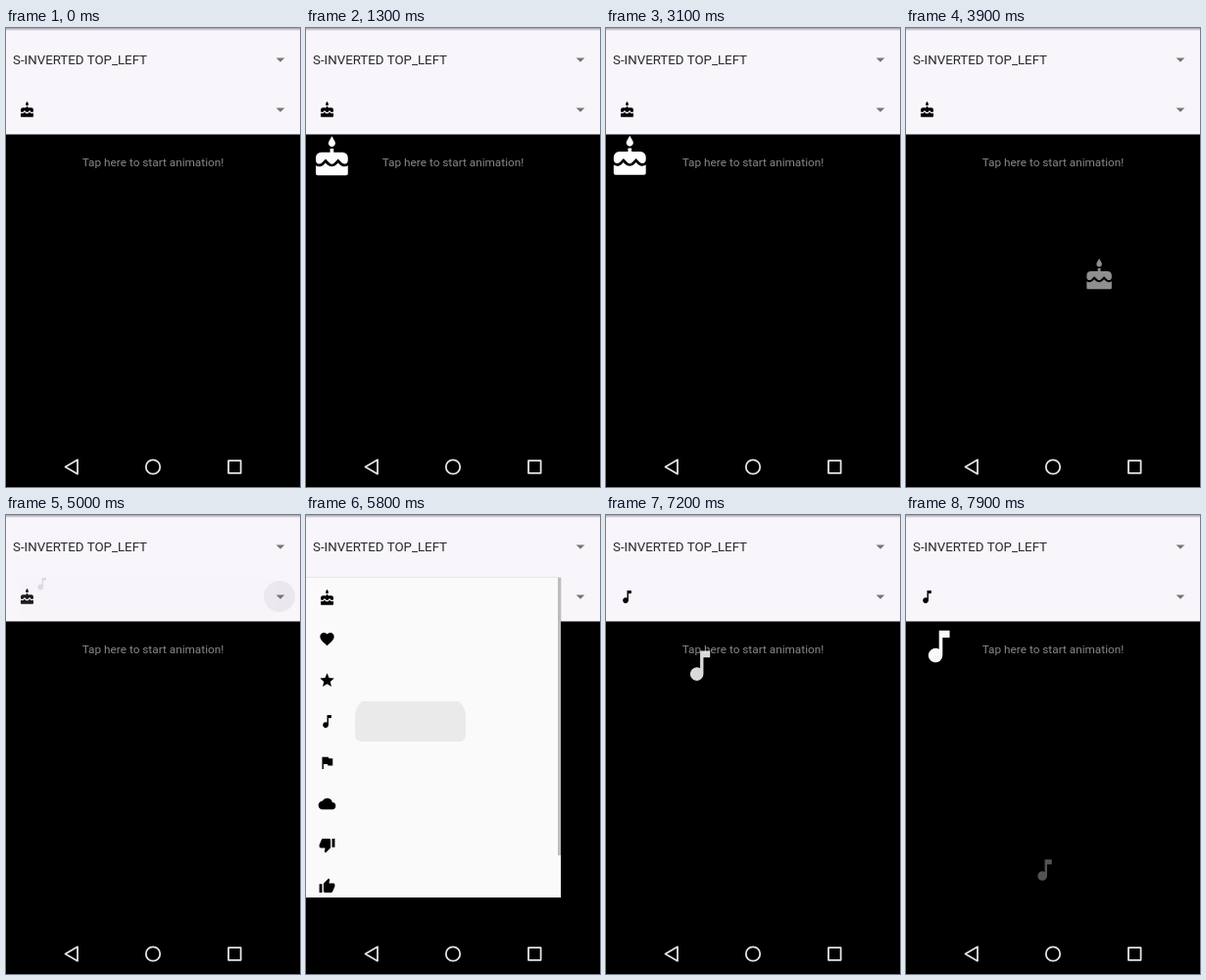
These frames come from a looping animation (300 px wide and 468 px high, 8 s). An HTML page:

```html
<!DOCTYPE html>
<html lang="en">
<head>
<meta charset="utf-8">
<title>Icon flight</title>
<style>
  html, body { margin: 0; width: 100%; height: 100%; overflow: hidden; background: #000; }
  svg { display: block; width: 100%; height: 100%; font-family: Roboto, sans-serif; }
</style>
</head>
<body>
<svg viewBox="0 0 300 468">
  <defs>
    <linearGradient id="topShade" x2="0" y2="1">
      <stop stop-color="#a39fab"/><stop offset="1" stop-color="#f8f5fb"/>
    </linearGradient>
    <clipPath id="menuClip"><rect id="menuClipBox"/></clipPath>
    <path id="route" d="M22 131C452 242-90 385 278 413"/>
    <!-- 24-unit icons, centred on the origin -->
    <path id="cake" transform="translate(-12 -12)" d="M12 6a2 2 0 0 0 1.7-3L12 0l-1.7 3A2 2 0 0 0 12 6z
      M18 9h-5V7h-2v2H6a3 3 0 0 0-3 3v1.5c0 2 2.2 2.6 3.4 1.4l2.1-2.1 2.1 2.1a2 2 0 0 0 2.8 0l2.1-2.1 2.1 2.1c1.2 1.2 3.4.6 3.4-1.4V12a3 3 0 0 0-3-3z
      M3 16.4V21a1 1 0 0 0 1 1h16a1 1 0 0 0 1-1v-4.6c-1.4.9-3.2.8-4.4-.4l-1.1-1.1L14.4 16a3.5 3.5 0 0 1-4.9 0l-1.1-1.1L7.4 16c-1.2 1.2-3 1.3-4.4.4z"/>
    <path id="heart" transform="translate(-12 -12)" d="M12 21.3l-1.5-1.3C5.4 15.4 2 12.3 2 8.5A5.4 5.4 0 0 1 7.5 3c1.7 0 3.4.8 4.5 2.1A6 6 0 0 1 16.5 3 5.4 5.4 0 0 1 22 8.5c0 3.8-3.4 6.9-8.5 11.5z"/>
    <path id="star" transform="translate(-12 -12)" d="M12 17.3l6.2 3.7-1.6-7L22 9.2l-7.2-.6L12 2 9.2 8.6 2 9.2 7.5 14l-1.7 7z"/>
    <path id="note" transform="translate(-12 -12)" d="M12 3v10.5A4 4 0 1 0 14 17V7h4V3z"/>
    <path id="flag" transform="translate(-12 -12)" d="M14.4 6L14 4H5v17h2v-7h5.6l.4 2h7V6z"/>
    <path id="cloud" transform="translate(-12 -12)" d="M19.4 10A7.5 7.5 0 0 0 5.4 8 6 6 0 0 0 6 20h13a5 5 0 0 0 .4-10z"/>
    <path id="thumbDown" transform="translate(-12 -12)" d="M15 3H6c-.8 0-1.5.5-1.8 1.2l-3 7.1L1 12v2a2 2 0 0 0 2 2h6.3l-1 4.9.5 1.1 1 1 6.6-6.6c.4-.4.6-.9.6-1.4V5a2 2 0 0 0-2-2zm4 0v12h4V3z"/>
    <use id="thumbUp" href="#thumbDown" transform="rotate(180)"/>
    <path id="arrow" d="M-4.3-2.1h8.6L0 2.2z" fill="#757575"/>
  </defs>

  <rect width="300" height="468"/>
  <rect width="300" height="108.5" fill="#f8f5fb"/>
  <rect width="300" height="3" fill="url(#topShade)"/>
  <text x="7" y="37" font-size="13.3" fill="#2a2a2a">S-INVERTED TOP_LEFT</text>
  <text x="150" y="141" font-size="11.8" fill="#888" text-anchor="middle">Tap here to start animation!</text>
  <circle id="arrowRipple" cx="279" cy="83" r="16"/>
  <use href="#arrow" x="280" y="32.5"/>
  <use href="#arrow" x="280" y="83.5"/>
  <use id="selected" transform="translate(21.5 83.5) scale(.72)"/>

  <g fill="none" stroke="#e4e4e4" stroke-width="1.8" stroke-linejoin="round">
    <path d="M60.5 447.5L73 440.3v14.4z"/>
    <circle cx="150" cy="447.5" r="7.2"/>
    <rect x="227" y="441.2" width="12.6" height="12.6"/>
  </g>

  <g id="flights" fill="#fff"></g>

  <g id="menu">
    <rect id="menuShadow" x="-1" y="63" width="262" height="328" rx="2"/>
    <g clip-path="url(#menuClip)">
      <rect y="64" width="300" height="326" fill="#fafafa"/>
      <g id="items">
        <path id="itemRipple" d="M57 190H156Q163 196 163 206V224Q163 231 156 231H57Q50 231 50 224V206Q50 196 57 190z"/>
      </g>
      <rect id="scrollbar" x="257" y="64" width="3" height="283"/>
    </g>
  </g>
</svg>
<script>
const LOOP = 8000, FLIGHT = 1880;
const $ = id => document.getElementById(id);
const clamp = v => Math.max(0, Math.min(1, v));
const mix = (a, b, p) => a + (b - a) * p;
const set = (el, attrs) => { for (const k in attrs) el.setAttribute(k, attrs[k]); };

function addIcon(parent, name, attrs = {}) {
  const icon = $('selected').cloneNode();
  icon.removeAttribute('id');
  set(icon, { href: '#' + name, ...attrs });
  parent.append(icon);
  return icon;
}

['cake', 'heart', 'star', 'note', 'flag', 'cloud', 'thumbDown', 'thumbUp'].forEach((name, i) =>
  addIcon($('items'), name, { transform: `translate(21.5 ${84.5 + 42 * i}) scale(.72)` }));

const flights = [['cake', 1188], ['cake', 3020], ['note', 6722], ['note', 7716]]
  .map(([name, start]) => ({ start, icon: addIcon($('flights'), name) }));
const route = $('route'), routeLength = route.getTotalLength();

function drawFlight({ icon, start }, t) {
  const p = (t - start) / FLIGHT;
  const eased = (1 - Math.cos(Math.PI * clamp(p))) / 2;
  const { x, y } = route.getPointAtLength(eased * routeLength);
  set(icon, {
    transform: `translate(${x} ${y}) scale(${1.83 * (1 - eased / 2)})`,
    opacity: p >= 0 && p < 1 ? 1 - .97 * eased : 0
  });
}

function drawMenu(t) {
  const open = clamp((t - 4980) / 200), close = clamp((t - 5900) / 170);
  set($('menu'), { opacity: open * (1 - close) });
  // The list unrolls downwards while it slides into place.
  set($('menuClipBox'), { x: mix(16, 0, open), y: 64, width: 260, height: mix(8, 326, open) });
  set($('items'), { transform: `translate(${mix(17, 0, open)} ${mix(-157, 0, open)})` });
  set($('menuShadow'), { opacity: open === 1 ? .07 : 0 });
  set($('scrollbar'), { opacity: open === 1 ? .25 : 0 });
  set($('itemRipple'), { opacity: .12 * clamp((t - 5750) / 100) });
  set($('arrowRipple'), { opacity: .055 * Math.min(clamp((t - 4780) / 100), clamp((5250 - t) / 250)) });
}

function draw(now) {
  const t = now % LOOP;
  set($('selected'), { href: t >= 5950 ? '#note' : '#cake' });
  flights.forEach(f => drawFlight(f, t));
  drawMenu(t);
}

const origin = performance.now();
(function tick() {
  draw(performance.now() - origin);
  requestAnimationFrame(tick);
})();
</script>
</body>
</html>
```
